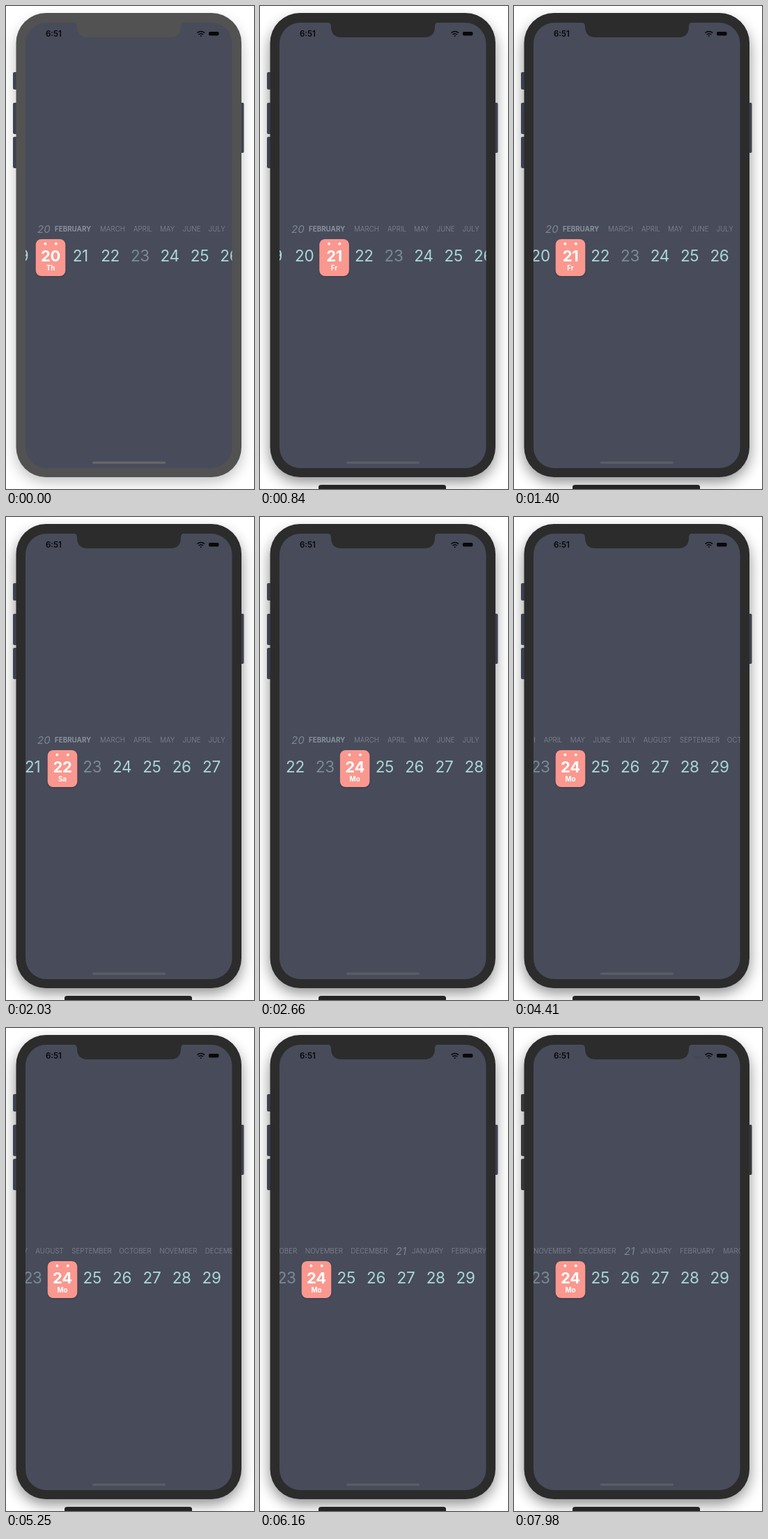
Recreate the animation shown at these times as an HTML page. Size 356x694 px, loop 8 s.

```html
<!DOCTYPE html>
<html lang="en">
<head>
<meta charset="utf-8">
<style>
html, body { margin: 0; width: 100%; height: 100%; overflow: hidden; background: #fff; }
svg { display: block; width: 356px; height: 694px; font-family: Inter, Roboto, sans-serif; }
.day { font-size: 22.5px; letter-spacing: -.3px; text-anchor: middle; fill: #a8d8d5; }
.rest { fill: #788b95; }
.card text { fill: #fff; font-weight: 700; text-anchor: middle; }
.month { font-size: 9.8px; font-weight: 300; fill: #858894; }
.year { font-size: 15px; font-style: italic; font-weight: 400; fill: #7c8791; }
.now { font-weight: 700; fill: #85929c; }
</style>
</head>
<body>
<svg viewBox="0 0 356 694">
  <defs>
    <clipPath id="screen"><rect x="28" y="24" width="296.5" height="640" rx="30"/></clipPath>
    <filter id="blur" x="-30%" y="-30%" width="160%" height="160%"><feGaussianBlur stdDeviation="10"/></filter>
    <filter id="soft" x="-30%" y="-30%" width="160%" height="160%"><feGaussianBlur stdDeviation="1.2"/></filter>
  </defs>
  <rect id="shadow" x="14" y="20" width="324" height="664" rx="44" filter="url(#blur)"/>
  <path id="buttons" d="M16 95h-4q-2 0-2 2v21q0 2 2 2h4zM16 139h-4q-2 0-2 2v41q0 2 2 2h4zM16 188h-4q-2 0-2 2v41q0 2 2 2h4zM336 139h4q1.500 0 1.500 2v68q0 2-1.500 2h-4z"/>
  <rect class="bezel" x="14.500" y="10" width="323.500" height="667" rx="43"/>
  <rect x="28" y="24" width="296.500" height="640" rx="30" fill="#484b5a"/>
  <path class="bezel" d="M96 23.500q6 0 6 6q0 15.500 15 15.500h119q15 0 15-15.500q0-6 6-6z"/>
  <text x="57" y="44" font-size="11.500" font-weight="600" fill="#08080a">6:51</text>
  <g fill="none" stroke="#08080a" stroke-width="1.500">
    <path d="M274.500 38.700q5.300-4.400 10.600 0M276.500 41q3.300-2.700 6.600 0"/>
    <circle cx="279.800" cy="43" r=".8" fill="#08080a" stroke-width=".5"/>
  </g>
  <rect x="291" y="37" width="14.500" height="5.500" rx="1.800" fill="#08080a"/>
  <path id="dots" d="M258.500 42h10" stroke="#353744" stroke-dasharray="1.500 1.500"/>
  <rect id="home" x="124" y="654.500" width="105" height="3.300" rx="1.600"/>
  <path id="next" d="M84 694v-3q0-3 4-3h175q4 0 4 3v3z" fill="#242424"/>
  <g clip-path="url(#screen)">
    <g id="months"></g>
    <g id="days"></g>
  </g>
</svg>
<script>
const $ = id => document.getElementById(id);
const PITCH = 42.8, LOOP = 8000;
const weekday = ['Su', 'Mo', 'Tu', 'We', 'Th', 'Fr', 'Sa'];
// [selection time, day, scroll start, strip offset]
const picks = [[0, 20, 0, 0], [770, 21, 820, 25.8], [1480, 22, 1520, 68.6], [2480, 24, 2520, 154.2]];
const labels = [
  ['20', 45, 'year'], ['FEBRUARY', 70, 'now'], ['MARCH', 135], ['APRIL', 183], ['MAY', 221],
  ['JUNE', 253.5], ['JULY', 290.5], ['AUGUST', 326], ['SEPTEMBER', 378], ['OCTOBER', 446],
  ['NOVEMBER', 504], ['DECEMBER', 569.5], ['21', 634, 'year'], ['JANUARY', 657],
  ['FEBRUARY', 714], ['MARCH', 776], ['APRIL', 824]
];

$('months').innerHTML = labels.map(([name, x, kind = '']) =>
  `<text class="${kind === 'year' ? kind : 'month ' + kind}" x="${x}" y="${kind === 'year' ? 325.7 : 324}">${name}</text>`).join('');

let html = '';
for (let d = 19; d < 30; d++) {
  const x = 64 + PITCH * (d - 20);
  html += `<text class="day ${d === 23 ? 'rest' : ''}" id="d${d}" x="${x}" y="366.5">${d}</text>
    <g class="card" id="c${d}" transform="translate(${x})">
      <rect x="-21.300" y="336" width="42.600" height="53" rx="8" fill="#30323d" opacity=".6" filter="url(#soft)"/>
      <rect x="-21.300" y="335" width="42.600" height="53" rx="8" fill="#fa988f"/>
      <circle cx="-7.600" cy="341.700" r="1.900" fill="#fff"/><circle cx="7.800" cy="341.700" r="1.900" fill="#fff"/>
      <text y="366.500" font-size="22" letter-spacing="-.3">${d}</text>
      <text y="380" font-size="9.800">${weekday[(d - 16) % 7]}</text>
    </g>`;
}
$('days').innerHTML = html;

const clamp = v => Math.min(1, Math.max(0, v));
const mix = (a, b, k) => a + (b - a) * k;
const ease = u => u * u * (3 - 2 * u);

function monthShift(t) {
  if (t < 3430) return 0;
  if (t < 4410) return 140 * ((t - 3430) / 980) ** 1.2;
  if (t < 6160) return mix(140, 439, (t - 4410) / 1750);
  return 439 + 37 * (1 - Math.exp((6160 - t) / 216));
}

function draw(t) {
  let day = 20, shift = 0;
  for (const [at, d, start, to] of picks) {
    if (t >= at) day = d;
    shift = mix(shift, to, ease(clamp((t - start) / 350)));
  }
  for (let d = 19; d < 30; d++) {
    $('d' + d).style.display = d === day ? 'none' : '';
    $('c' + d).style.display = d === day ? '' : 'none';
  }
  $('days').setAttribute('transform', `translate(${-shift})`);
  $('months').setAttribute('transform', `translate(${-monthShift(t)})`);

  const dark = clamp(Math.floor(t / 70) / 3), g = Math.round(mix(82, 44, dark));
  document.querySelectorAll('.bezel').forEach(e => e.setAttribute('fill', `rgb(${g},${g},${g})`));
  $('next').style.display = t < 70 ? 'none' : '';
  $('home').setAttribute('fill', t < 70 ? '#66676c' : '#5b5d67');
  $('shadow').setAttribute('opacity', t < 490 ? .25 : .45);
  const plain = t >= 3010 && t < 3430 || t >= 7490;
  $('buttons').setAttribute('fill', plain ? '#38383a' : '#3e4150');
  $('dots').style.display = plain ? '' : 'none';
}

function tick() {
  draw(performance.now() % LOOP);
  requestAnimationFrame(tick);
}
tick();
</script>
</body>
</html>
```
